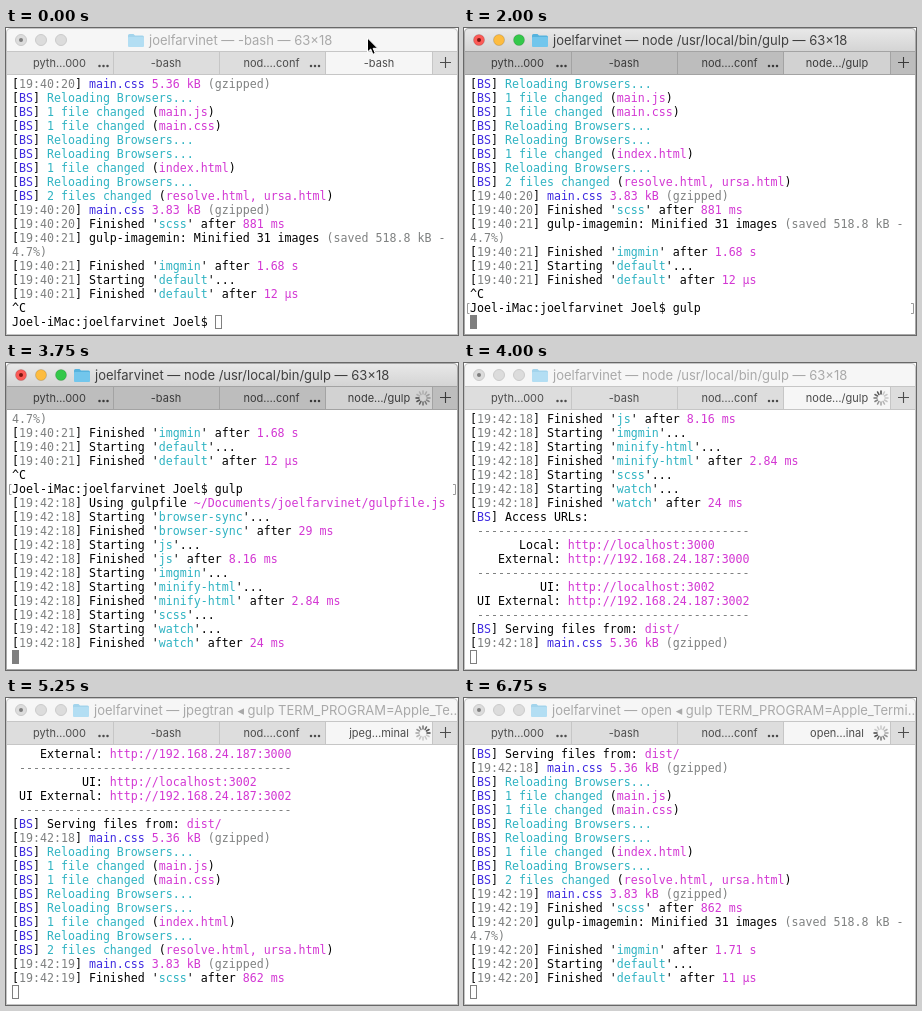
An HTML page that plays this animation: 452 px wide and 307 px high, repeating every 7 s.

```html
<!DOCTYPE html>
<html lang="en">
<head>
<meta charset="utf-8">
<title>Terminal running gulp</title>
<style>
html, body { margin: 0; width: 100%; height: 100%; overflow: hidden; background: #fff; }
#win {
  --bar1: #f6f6f6; --bar2: #f6f6f6; --tab: #dddddd; --active: #f6f6f6; --line: #c6c6c6;
  --title: #a9a9a9; --label: #4c4c4c; --edge: #c4c4c4; --folder: #b3def3; --flap: #a3d4ec;
  --red: #dcdcdc; --yellow: #dcdcdc; --green: #dcdcdc; --ring: #cbcbcb; --dot: #7d7d7d;
  position: absolute; left: 0; top: 0; width: 452px; height: 307px; overflow: hidden; background: #fff;
}
#win.focus {
  --bar1: #e9e9e9; --bar2: #d3d3d3; --tab: #bdbdbd; --active: #d2d2d2; --line: #a3a3a3;
  --title: #3f3f3f; --label: #3a3a3a; --edge: #a8a8a8; --folder: #72c6ec; --flap: #56b3de;
  --red: #fc5b57; --yellow: #fdbc40; --green: #34c84a; --ring: rgba(0,0,0,.14); --dot: #7c1510;
}
svg { position: absolute; left: 0; top: 0; }
svg text { font-family: Inter, "Open Sans", sans-serif; white-space: pre; }
#title { font-size: 13px; fill: var(--title); }
.label { font-size: 11px; fill: var(--label); text-anchor: middle; }
.line { stroke: var(--line); }
.light { stroke: var(--ring); }
#log {
  position: absolute; left: 6px; top: 49px; margin: 0; color: #000;
  font: 11.628px/14px "DejaVu Sans Mono", "Liberation Mono", monospace;
  font-variant-ligatures: none;
}
.row { height: 14px; white-space: pre; }
.b { color: #3f2be0; }
.m { color: #d338d3; }
.c { color: #2fb3c2; }
.g { color: #7f8181; }
#caret {
  position: absolute; top: 287px; width: 7px; height: 14px; box-sizing: border-box;
  border: 1px solid #7f7f7f;
}
.focus #caret { background: #7f7f7f; }
</style>
</head>
<body>
<div id="win">
  <div id="log"></div>
  <div id="caret"></div>
  <svg id="chrome" width="452" height="307" viewBox="0 0 452 307">
    <defs>
      <linearGradient id="bar" x1="0" y1="0" x2="0" y2="1">
        <stop offset="0" style="stop-color:var(--bar1)"/>
        <stop offset="1" style="stop-color:var(--bar2)"/>
      </linearGradient>
    </defs>
    <path d="M0 24V5Q0 0 5 0H447Q452 0 452 5V24Z" fill="url(#bar)"/>
    <rect y="24" width="452" height="22" fill="var(--tab)"/>
    <rect x="320" y="24" width="106" height="22" fill="var(--active)"/>
    <path class="line" d="M0 23.5H452M0 46.5H452M107.5 24V46M213.5 24V46M319.5 24V46M426.5 24V46"/>
    <path d="M.5 307V5Q.5 .5 5 .5H447Q451.5 .5 451.5 5V307M0 306.5H452" fill="none" stroke="var(--edge)"/>
    <circle class="light" cx="15" cy="12" r="5.5" fill="var(--red)"/>
    <circle class="light" cx="35" cy="12" r="5.5" fill="var(--yellow)"/>
    <circle class="light" cx="55" cy="12" r="5.5" fill="var(--green)"/>
    <circle cx="15" cy="12" r="2" fill="var(--dot)"/>
    <g id="head">
      <path d="M0 7.5Q0 6 1.5 6H5.5L7 7.5H14.5Q16 7.5 16 9V12H0Z" fill="var(--flap)"/>
      <rect y="9" width="16" height="10" rx="1" fill="var(--folder)"/>
      <text id="title" x="21" y="17"></text>
    </g>
    <text class="label" x="53.5" y="39">pyth…000</text>
    <text class="label" x="160" y="39">-bash</text>
    <text class="label" x="265.5" y="39">nod….conf</text>
    <text class="label" id="tab" x="373" y="39"></text>
    <g fill="var(--label)" id="dots"></g>
    <path d="M434 34.5H445M439.5 29V40" stroke="var(--label)" stroke-width="1.1"/>
    <g id="spin" stroke="#444" stroke-width="1.5" stroke-linecap="round"></g>
    <g id="marks" fill="none" stroke="#9a9a9a">
      <path d="M5.5 .5H3.5V10.5H5.5M447 .5H449.5V10.5H447"/>
    </g>
    <path id="mouse" d="M1 1V15L4.2 12L6.4 17.3L8.8 16.3L6.6 11.3H11.2Z" fill="#000" stroke="#fff" stroke-width="1"/>
  </svg>
</div>
<script>
const $ = id => document.getElementById(id);
const USER = "joelfarvinet";
const ink = (cls, s) => `<span class="${cls}">${s}</span>`;

// Log line builders
const at = (time, s) => `[${ink("g", time)}] ${s}`;
const bs = s => `[${ink("b", "BS")}] ${s}`;
const css = (time, size) => at(time, `${ink("b", "main.css")} ${ink("m", size + " kB")} ${ink("g", "(gzipped)")}`);
const start = (time, task) => at(time, `Starting '${ink("c", task)}'...`);
const done = (time, task, took) => at(time, `Finished '${ink("c", task)}' after ${ink("m", took)}`);
const changed = (n, files) => bs(`${ink("c", n + " changed")} (${ink("m", files)})`);
const reload = bs(ink("c", "Reloading Browsers..."));
const url = (name, addr) => `${name.padStart(12)}: `.padStart(14) + ink("m", "http://" + addr);
const rule = " " + ink("g", "-".repeat(39));

const reloads = [
  reload, changed("1 file", "main.js"), changed("1 file", "main.css"),
  reload, reload, changed("1 file", "index.html"),
  reload, changed("2 files", "resolve.html, ursa.html")
];
const finish = (t1, scss, t2, img, total) => [
  css(t1, "3.83"),
  done(t1, "scss", scss),
  at(t2, "gulp-imagemin: Minified 31 images " + ink("g", "(saved 518.8 kB -")),
  ink("g", "4.7%)"),
  done(t2, "imgmin", img),
  start(t2, "default"),
  done(t2, "default", total)
];

const T = "19:42:18";
const prompt = `Joel-iMac:${USER} Joel$ `;
const log = [
  css("19:40:20", "5.36"), ...reloads,
  ...finish("19:40:20", "881 ms", "19:40:21", "1.68 s", "12 µs"),
  "^C",
  prompt + "gulp",
  at(T, "Using gulpfile " + ink("m", `~/Documents/${USER}/gulpfile.js`)),
  start(T, "browser-sync"), done(T, "browser-sync", "29 ms"),
  start(T, "js"), done(T, "js", "8.16 ms"),
  start(T, "imgmin"),
  start(T, "minify-html"), done(T, "minify-html", "2.84 ms"),
  start(T, "scss"),
  start(T, "watch"), done(T, "watch", "24 ms"),
  bs("Access URLs:"),
  rule, url("Local", "localhost:3000"), url("External", "192.168.24.187:3000"),
  rule, url("UI", "localhost:3002"), url("UI External", "192.168.24.187:3002"),
  rule,
  bs("Serving files from: " + ink("m", "dist/")),
  css(T, "5.36"), ...reloads,
  ...finish("19:42:19", "862 ms", "19:42:20", "1.71 s", "11 µs")
];
const promptRow = 17;

// Each step holds until the next; top is the first visible log line
const bash = { title: "-bash — 63×18", tab: "-bash", x: 122 };
const node = { title: "node /usr/local/bin/gulp — 63×18", tab: "node…/gulp", x: 68 };
const child = (name, tail, tab) => ({ title: `${name} ◂ gulp TERM_PROGRAM=Apple_${tail}…`, tab, x: 67 });
const steps = [
  { t: 0, top: 0, typed: "", mouse: 9, ...bash },
  { t: 250, top: 0, typed: "", mouse: 3, focus: true, ...bash },
  { t: 500, top: 0, typed: "", focus: true, ...bash },
  { t: 1250, top: 0, typed: "gulp", focus: true, ...bash },
  { t: 2000, top: 1, focus: true, ...node },
  { t: 3750, top: 12, focus: true, ...node },
  { t: 4000, top: 22, ...node },
  { t: 4250, top: 30, ...child("optipng", "Te", "optip…inal") },
  { t: 4500, top: 32, ...child("jpegtran", "Te", "jpeg…minal") },
  { t: 5500, top: 37, ...child("open", "Termi", "open…inal") }
];
const LOOP = 7000, TICK = 250, SPIN_FROM = 2500;

$("dots").innerHTML = [97.5, 309].map(x =>
  [-4, 0, 4].map(d => `<circle cx="${x + d}" cy="38" r="1.25"/>`).join("")).join("");
$("spin").innerHTML = Array.from({ length: 12 }, (_, i) =>
  `<path d="M417 31V28" transform="rotate(${i * 30} 417 35)"/>`).join("");
const spokes = [...$("spin").children];

function show(s) {
  const typing = s.typed !== undefined;
  const rows = log.slice(s.top, s.top + 17);
  if (typing) rows.push(prompt + s.typed);
  $("log").innerHTML = rows.map(r => `<div class="row">${r}</div>`).join("");
  $("caret").style.left = 6 + 7 * (typing ? prompt.length + s.typed.length : 0) + "px";
  $("win").classList.toggle("focus", !!s.focus);
  $("title").textContent = `${USER} — ${s.title}`;
  $("head").setAttribute("transform", `translate(${s.x} 0)`);
  $("tab").textContent = s.tab;

  const row = promptRow - s.top;
  $("marks").style.display = !typing && row >= 0 ? "" : "none";
  $("marks").setAttribute("transform", `translate(0 ${51 + 14 * row})`);
  $("mouse").style.display = s.mouse ? "" : "none";
  $("mouse").setAttribute("transform", `translate(360.5 ${s.mouse || 0})`);
}

function spin(t) {
  $("spin").style.display = t < SPIN_FROM ? "none" : "";
  const lead = Math.floor(t / TICK) * 3;
  spokes.forEach((p, i) => {
    const age = (((lead - i) % 12) + 12) % 12;
    p.setAttribute("opacity", Math.max(0.25, 1 - age * 0.09));
  });
}

let current;
function draw(now) {
  const t = now % LOOP;
  const step = steps.findLast(s => s.t <= t);
  if (step !== current) show(current = step);
  spin(t);
}
function loop() {
  draw(performance.now());
  requestAnimationFrame(loop);
}
loop();
</script>
</body>
</html>
```
